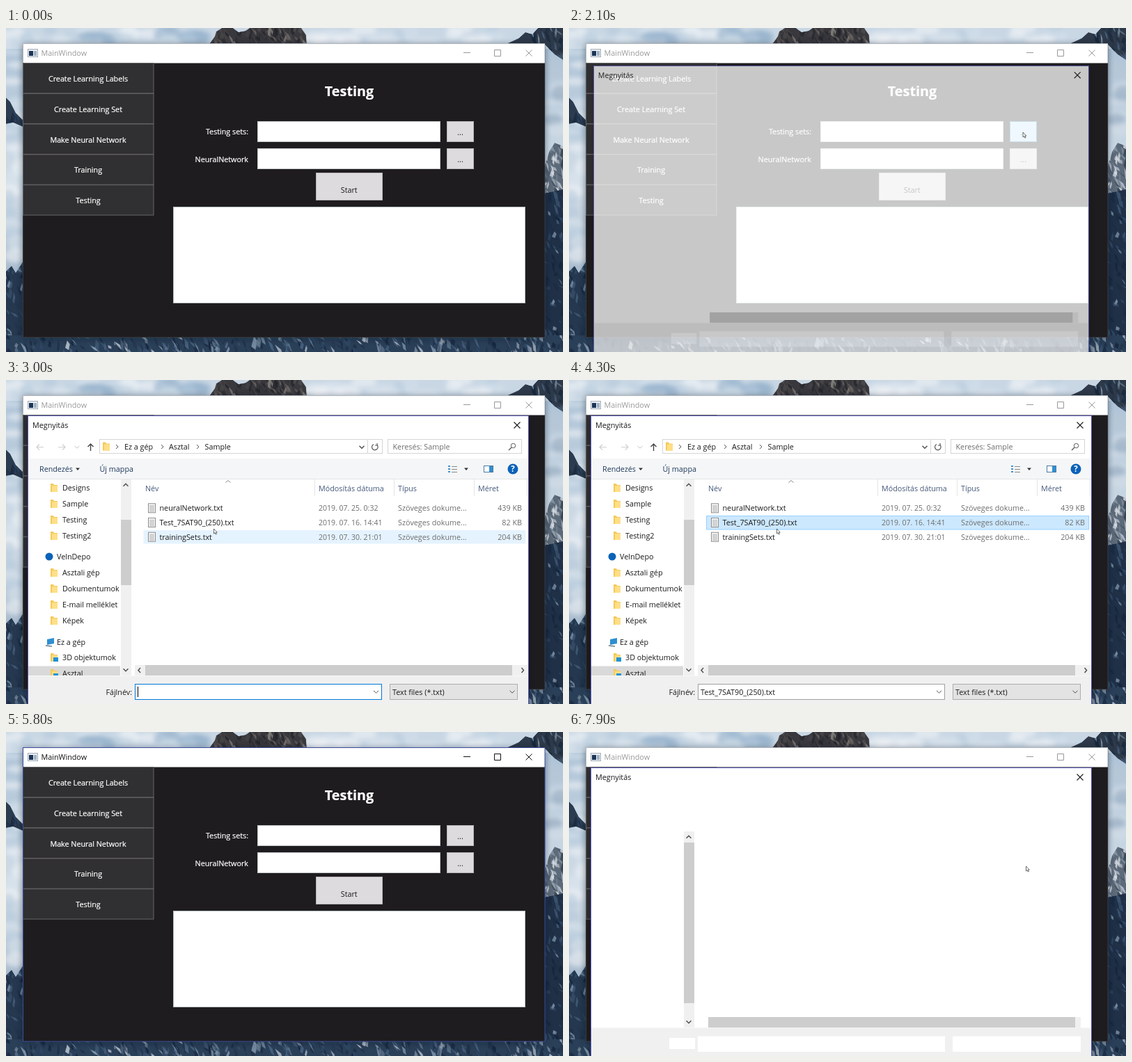
An HTML page for the animation above (8 s loop, 800x466 px).

```html
<!DOCTYPE html>
<html lang="hu">
<head>
<meta charset="utf-8">
<title>Testing</title>
<style>
html, body { margin: 0; width: 100%; height: 100%; overflow: hidden; background: #24364b; }
svg { display: block; width: 800px; height: 466px; font: 10.75px 'Open Sans', 'Noto Sans', sans-serif; }
text { white-space: pre; }
.label { stroke: #fff; stroke-width: .22px; }
</style>
</head>
<body>
<svg id="stage" viewBox="0 0 800 466"></svg>
<script>
const LOOP = 8000, STEP = 100;
const stage = document.getElementById('stage');

// Markup helpers
const rect = (x, y, w, h, fill, stroke = 'none', extra = '') =>
  `<rect x="${x}" y="${y}" width="${w}" height="${h}" fill="${fill}" stroke="${stroke}" ${extra}/>`;
const box = (x, y, w, h, fill, stroke, extra) => rect(x + .5, y + .5, w - 1, h - 1, fill, stroke, extra);
const text = (x, y, s, fill = '#1a1a1a', extra = '') => `<text x="${x}" y="${y}" fill="${fill}" ${extra}>${s}</text>`;
const label = (x, y, s, extra = '') => text(x, y, s, '#fff', 'class="label" ' + extra);
const line = (d, stroke, width = 1, extra = '') =>
  `<path d="${d}" fill="none" stroke="${stroke}" stroke-width="${width}" ${extra}/>`;
const shape = (d, fill, extra = '') => `<path d="${d}" fill="${fill}" ${extra}/>`;
const group = (id, content, extra = '') => `<g id="${id}" ${extra}>${content}</g>`;
const MID = 'text-anchor="middle"', END = 'text-anchor="end"';

let seed = 11;
const rnd = () => (seed = (seed * 16807) % 2147483647) / 2147483647;
const pick = list => list[Math.floor(rnd() * list.length)];

// A rock face: an outline filled with random slanted streaks
let rocks = 0;
function rock(outline, x, y, w, h, count, base, tones) {
  const id = 'rock' + rocks++;
  let out = `<clipPath id="${id}"><path d="${outline}"/></clipPath><g clip-path="url(#${id})" filter="url(#blend)">` + shape(outline, base);
  for (let i = 0; i < count; i++) {
    const px = x + rnd() * w, py = y + rnd() * h, a = (rnd() - .35) * 12, b = 4 + rnd() * 11, c = 2 + rnd() * 4;
    out += shape(`M${px} ${py}l${a} ${b}l${c} ${b * .3}l${-a * .6} ${-b * .8}z`, pick(tones), `opacity="${.35 + rnd() * .5}"`);
  }
  return out + '</g>';
}

function clouds(count, x, y, w, h, tones) {
  let out = '';
  for (let i = 0; i < count; i++)
    out += `<ellipse cx="${x + rnd() * w}" cy="${y + (i + rnd()) / count * h}" rx="${8 + rnd() * 16}" ry="${4 + rnd() * 9}" fill="${pick(tones)}" opacity=".55"/>`;
  return `<g filter="url(#soft)">${out}</g>`;
}

function wallpaper() {
  const navy = ['#14233a', '#1b2b40', '#304a67', '#4b6683', '#8ba1b6', '#22344a'];
  const snow = ['#e9eef2', '#cfd8e1', '#8898a8', '#2a3645', '#4a5868'];
  const stone = ['#1d2026', '#4d494a', '#6b6361', '#2d2d33', '#8a8583'];
  const pale = ['#f2f5f8', '#dbe5ee', '#b4c8da'];
  let out = rect(0, 0, 800, 466, 'url(#sky)') + rect(0, 0, 800, 30, '#c9d7e4');
  out += clouds(26, 0, 0, 290, 24, pale.concat('#8fadc8')) + clouds(16, 440, 0, 280, 24, pale);
  out += clouds(20, 0, 25, 24, 310, pale) + clouds(9, 776, 45, 24, 110, ['#8ea6bc', '#b7c7d6', '#d5dfe8']);
  out += rock('M292 23L300 12 302 5 310 0H326L334 6 344 4 350 0H424L431 10 432 23Z', 290, -8, 145, 30, 110, '#38383d', stone);
  out += rock('M718 23L736 15 746 6 756 9 764 0H800V46L788 38 774 24Z', 716, -8, 88, 54, 60, '#2e3a49', navy);
  out += rock('M0 100L6 106 14 122 24 132V142L10 136 0 138Z', 0, 95, 24, 44, 14, '#2c3c50', navy.slice(0, 3));
  out += rock('M772 205L780 178 788 165 800 170V246H772Z', 768, 160, 34, 84, 70, '#5c6a79', snow);
  out += rock('M772 238L800 232V466H772Z', 768, 230, 34, 236, 90, '#1f3047', navy);
  out += rock('M0 350L8 342 14 352 25 335V466H0Z', -5, 335, 30, 130, 50, '#25384f', navy);
  out += rock('M0 442H800V466H0Z', -10, 434, 810, 30, 330, '#2a3f58', navy.concat('#c3cdd7'));
  return out;
}

function mainWindow() {
  let out = rect(24, 24, 750, 422, '#0a1420', 'none', 'opacity=".5" filter="url(#shadow)"');
  out += rect(24, 22, 750, 423, '#1f1c1f') + rect(24, 22, 750, 28.5, '#fff');
  out += rect(31.5, 30.5, 14, 11, '#e9eef3', '#a3adb6') + rect(33, 33, 6, 7, '#1d3557') + rect(40, 33, 4, 7, '#9fb2c4');
  out += group('caption', text(50.5, 40, 'MainWindow', 'currentColor') +
    line('M657 35.500h10M701.500 31.500h9v9h-9zM746.500 31.500l9 9m0-9l-9 9', 'currentColor'));
  ['Create Learning Labels', 'Create Learning Set', 'Make Neural Network', 'Training', 'Testing'].forEach((s, i) => {
    const y = 50.5 + i * 43.8;
    out += rect(24.5, y, 187.5, 43.4, '#302f31', '#656466') + label(118, y + 26.5, s, MID);
  });
  out += label(493, 98, 'Testing', MID + ' font-size="19.8" font-weight="700"');
  out += label(348, 153, 'Testing sets:', END) + label(348, 193, 'NeuralNetwork', END);
  for (const y of [135, 174]) out += box(361, y - 1, 263, 30, '#fff', '#c4c6ca');
  out += group('path', text(365, 147.5, 'C:\\Users\\fumeb\\Desktop\\Sample\\Test_7SAT90_(250).txt'), 'clip-path="url(#field)"');
  [135, 174].forEach((y, i) => {
    out += box(633, y - 1, 39, 30, '#dddbdd', '#b4b3b5', `id="browse${i}"`) + text(652.5, y + 19, '...', '#1a1a1a', MID);
  });
  out += box(635, 175, 35, 26, 'none', '#3c7fb1', 'id="focus" stroke-dasharray="1 1.5"');
  out += box(445, 208, 96, 40, '#dddbdd', '#b4b3b5') + text(492.7, 237, 'Start', '#1a1a1a', MID);
  out += box(240, 257, 506, 139, '#fff', '#b4baba');
  return out + rect(24.5, 22.5, 749.5, 422.5, 'none', 'currentColor', 'id="frame"');
}

const folder = (x, y) => shape(`M${x} ${y - 6}h4l1 2h5v10h-10z`, '#f5c95c') + rect(x + 2, y - 3, 8, 9, '#ffdf86');
const sheet = y => box(204, y - 7, 11, 14, '#fafafa', '#8b8b8b') +
  line(`M206 ${y - 3.5}h7m-7 2h7m-7 2h7m-7 2h7m-7 2h7`, '#9a9a9a', .8);
const chevron = (x, y, dy, color = '#505050', w = 1.4) => line(`M${x - 3.5} ${y - dy}l3.5 ${dy * 2}l3.5 ${-dy * 2}`, color, w);

function sidebar() {
  const rows = [['Designs', 155], ['Sample', 178], ['Testing', 201], ['Testing2', 224], ['VelnDepo', 254, 'cloud'],
    ['Asztali gép', 277], ['Dokumentumok', 300], ['E-mail melléklet', 323], ['Képek', 346],
    ['Ez a gép', 377, 'pc'], ['3D objektumok', 399, 'badge'], ['Asztal', 422, 'badge']];
  let out = rect(32, 411.5, 133, 16, '#d9d9d9');
  for (const [name, y, kind] of rows) {
    const root = kind === 'cloud' || kind === 'pc';
    if (kind === 'cloud') out += `<circle cx="62" cy="${y}" r="5.5" fill="#0a63b8"/>`;
    else if (kind === 'pc') out += shape(`M59 ${y - 4}l10-2v8l-10 2z`, '#2f8fd0') + line(`M57 ${y + 5}l9 1`, '#6a7884', 1.5);
    else out += folder(64, y);
    if (kind === 'badge') out += rect(68, y, 7, 6, '#1f93d6');
    out += text(root ? 73 : 81, y + 4, name);
  }
  return `<g clip-path="url(#side)">${out}</g>`;
}

function dialogContent() {
  let out = line('M54 96.5h-10m4-4l-4 4l4 4M75 96.5h10m-4-4l4 4l-4 4', '#d0d0d0', 1.2) + chevron(102, 96.5, 1.5, '#c4c4c4', 1) +
    line('M121.5 102v-10m-4 4l4-4l4 4', '#444', 1.4);
  out += box(134, 85, 407, 21, '#fff', '#d5d5d5') + line('M519.5 86v19', '#d5d5d5') + folder(139, 95.5);
  for (const x of [158, 223, 274]) out += line(`M${x} 93l3 3l-3 3`, '#555');
  out += text(170, 99.5, 'Ez a gép') + text(234, 99.5, 'Asztal') + text(285.5, 99.5, 'Sample') + chevron(511, 96.5, 1.8);
  out += line('M533 93.5a4.3 4.3 0 1 1-5-1m5-1.5v3h-3', '#555', 1.2);
  out += box(548, 85, 193, 21, '#fff', '#d5d5d5') + text(555.5, 99.5, 'Keresés: Sample', '#6d6d6d') +
    '<circle cx="728.5" cy="94.5" r="3.2" fill="none" stroke="#555"/>' + line('M726 97l-4 4', '#555', 1.3);
  out += rect(32, 113, 718, 29, '#f5f6f7') + line('M32 142.5h718', '#e4e5e6');
  out += text(48, 132, 'Rendezés', '#1e395b') + shape('M100 126.5h6l-3 3.5z', '#333') + text(134.5, 132, 'Új mappa', '#1e395b');
  out += line('M635 124h3m-3 4h3m-3 4h3', '#4a90c8', 2) + line('M640 124.5h8m-8 4h8m-8 4h8', '#888') + shape('M658 126.5h6l-3 3.5z', '#333');
  out += box(686, 123, 14, 10, '#fff', '#4b7ba5') + rect(694, 124, 5, 8, '#2f8fd0');
  out += '<circle cx="728" cy="128" r="7.5" fill="#0b62b8"/>' + text(728, 132.3, '?', '#fff', MID + ' font-weight="700" font-size="11.5"');
  out += chevron(319, 146, -1.5, '#888', 1);
  [['Név', 200], ['Módosítás dátuma', 449], ['Típus', 563], ['Méret', 678]].forEach(([s, x], i) => {
    out += text(x, 160, s, '#45597a');
    if (i) out += line(`M${x - 5.5} 143v24`, '#e4e4e4');
  });
  out += line('M748.5 143v24', '#e4e4e4') + box(197, 195, 550, 20.5, 'none', 'none', 'id="row"');
  [['neuralNetwork.txt', '2019. 07. 25. 0:32', '439 KB'], ['Test_7SAT90_(250).txt', '2019. 07. 16. 14:41', '82 KB'],
   ['trainingSets.txt', '2019. 07. 30. 21:01', '204 KB']].forEach(([name, date, size], i) => {
    const y = 184.3 + i * 20.7;
    out += sheet(y) + text(220.5, y + 4, name) + text(449, y + 4, date, '#6d6d6d', 'font-size="10.5"') +
      text(563, y + 4, 'Szöveges dokume...', '#6d6d6d') + text(741, y + 4, size, '#6d6d6d', END);
  });
  out += sidebar();
  out += rect(185, 410, 565, 15, '#f0f0f0') + rect(200, 410, 527, 15, '#cdcdcd') +
    line('M193 414l-3 3.5l3 3.5M740.5 414l3 3.5l-3 3.5', '#505050', 1.5);
  out += text(181, 453, 'Fájlnév:', '#1a1a1a', END);
  out += box(185, 437, 355, 23, '#fff', '#0078d7', 'id="nameBox"') + chevron(531.5, 448.5, 1.7, '#505050', 1);
  out += group('fileName', text(189, 453, 'Test_7SAT90_(250).txt')) + line('M189.5 441v15', '#000', 1, 'id="caret"');
  out += box(551, 437, 184, 23, '#e3e3e3', '#adadad', 'id="filter"') + text(555, 453, 'Text files (*.txt)') + chevron(727, 448.5, 1.7, '#505050', 1);
  return out;
}

function dialog() {
  const blank = rect(200, 410, 535, 15.5, '#f0f0f0') + rect(200, 410, 527, 15, '#cdcdcd') +
    rect(144, 440, 37, 16, '#fff') + rect(185, 437.5, 355, 22.5, '#fff') + rect(551, 437.5, 184, 22.5, '#fff');
  const scroll = rect(165, 143, 15, 282, '#f0f0f0') + rect(165, 159, 15, 231, '#cdcdcd', 'none', 'id="thumb"') +
    chevron(172, 151, -1.8) + chevron(172, 417, 1.8);
  return rect(31, 56, 720, 440, '#000', 'none', 'opacity=".3" filter="url(#shadow)"') +
    rect(31.5, 51.5, 719, 440, '#fff', '#5556b4') + rect(32, 425.5, 718, 66, '#f0f0f0') +
    text(38, 69, 'Megnyitás') + line('M729.5 60.5l9 9m0-9l-9 9', '#1a1a1a', 1.1) +
    group('blank', blank) + group('content', dialogContent()) + group('scroll', scroll);
}

stage.innerHTML = `<defs>
  <linearGradient id="sky" x2="0" y2="1"><stop offset="0" stop-color="#a9c0d5"/><stop offset=".5" stop-color="#d3dee8"/><stop offset="1" stop-color="#7e99b3"/></linearGradient>
  <filter id="soft"><feGaussianBlur stdDeviation="3"/></filter>
  <filter id="blend"><feGaussianBlur stdDeviation=".6"/></filter>
  <filter id="shadow"><feGaussianBlur stdDeviation="5"/></filter>
  <clipPath id="field"><rect x="363" y="136" width="260" height="26"/></clipPath>
  <clipPath id="side"><rect x="32" y="143" width="132" height="282"/></clipPath></defs>` +
  wallpaper() + group('main', mainWindow()) + group('dialog', dialog()) +
  group('cursor', shape('M0 0V7L1.6 5.6 2.8 8.1 3.9 7.6 2.8 5.2H4.8Z', '#fff', 'stroke="#333" stroke-width=".7"'));

const el = {};
stage.querySelectorAll('[id]').forEach(node => el[node.id] = node);
const set = (id, attrs) => { for (const k in attrs) el[id].setAttribute(k, attrs[k]); };
const show = (id, on) => set(id, { visibility: on ? 'inherit' : 'hidden' });

// Pointer stops: time, x, y
const stops = [[0, 690, 470], [1200, 690, 470], [1800, 652, 150], [2300, 652, 150], [2900, 298.5, 214],
  [4400, 298.5, 214], [5200, 640, 470], [6200, 645, 470], [7000, 656.5, 193], [LOOP, 656.5, 193]];

function pointer(t) {
  const i = stops.findIndex(s => s[0] > t), [t0, x0, y0] = stops[i - 1], [t1, x1, y1] = stops[i];
  const p = (t - t0) / (t1 - t0), e = p * p * (3 - 2 * p);
  return [x0 + (x1 - x0) * e, y0 + (y1 - y0) * e];
}

// Dialog opacity and scale
function dialogPose(t) {
  const opening = t >= 7600 ? t - 7600 : t - 2000;
  if (opening <= 0 || (t >= 5800 && t < 7600)) return [0, 1];
  if (opening < 200) return [.755, .989];
  if (t > 5500 && t < 5800) { const p = (t - 5500) / 300; return [1 - p, 1 - .045 * p]; }
  return [1, 1];
}

function update(t) {
  const [x, y] = pointer(t), [alpha, scale] = dialogPose(t);
  const inside = (x0, y0, x1, y1) => x >= x0 && x < x1 && y >= y0 && y < y1;
  set('cursor', { transform: `translate(${x} ${y})` });

  const active = t >= 5600 && t < 7000;
  set('caption', { color: active ? '#111' : '#999' });
  set('frame', { color: active ? '#3d4c9c' : '#5a5f68', opacity: active ? 1 : .45 });
  show('path', t >= 5900);
  [135, 174].forEach((top, i) => {
    const hot = inside(633, top, 672, top + 29) && (t < 2300 || t >= 6200);
    set('browse' + i, { fill: hot ? '#bee6fd' : '#dddbdd', stroke: hot ? '#3c7fb1' : '#b4b3b5' });
  });
  show('focus', t >= 7400);

  set('dialog', { opacity: alpha, transform: `translate(390.5 320) scale(${scale}) translate(-390.5 -320)` });
  show('dialog', alpha > 0);
  const loaded = t >= 2400 && t < 7600, chosen = t >= 3900;
  show('content', loaded);
  show('blank', !loaded);
  show('scroll', alpha === 1 || loaded);
  set('thumb', loaded ? { y: 201, height: 94 } : { y: 159, height: 231 });
  set('row', {
    y: t > 3000 ? 195.5 : 216,
    fill: chosen ? '#cce8ff' : t >= 2900 ? '#e5f3ff' : 'none',
    stroke: chosen ? '#99d1ff' : 'none'
  });
  show('fileName', loaded && chosen);
  show('caret', loaded && !chosen && (t + 100) % 1000 < 500);
  set('nameBox', { stroke: chosen ? '#a0a0a0' : '#0078d7' });
  const hot = inside(551, 437, 735, 460);
  set('filter', { fill: hot ? '#e5f1fb' : '#e3e3e3', stroke: hot ? '#0078d7' : '#adadad' });
}

// The picture advances in tenths of a second
const start = performance.now();
function tick() {
  const t = (performance.now() - start) % LOOP;
  update(Math.floor(t / STEP) * STEP);
  requestAnimationFrame(tick);
}
tick();
</script>
</body>
</html>
```
